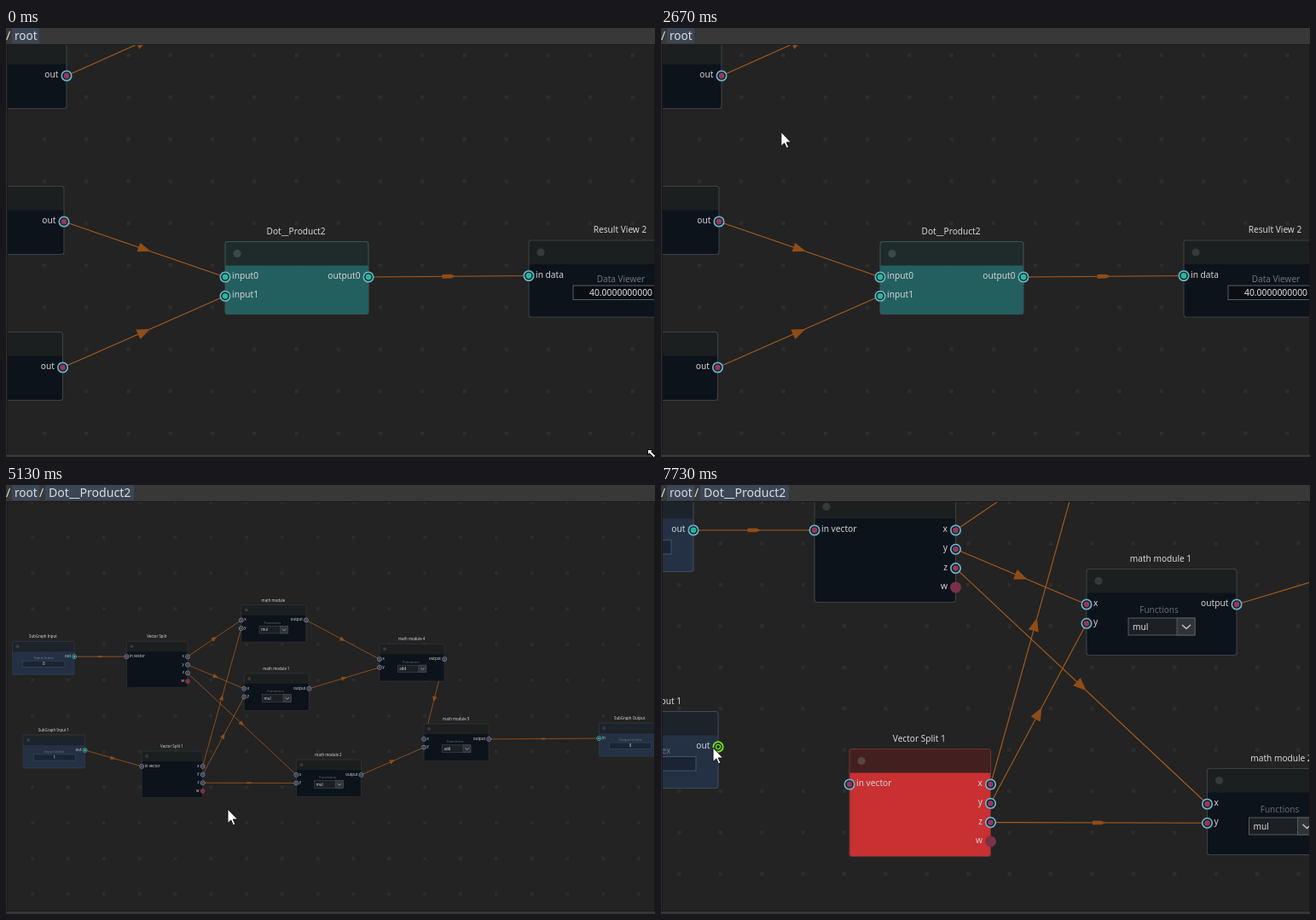
Animation of 761 by 503 pixels, one loop 8 s. Source, as an HTML page with a canvas:

```html
<!DOCTYPE html>
<html>
<head>
<meta charset="utf-8">
<style>
html, body { margin: 0; width: 100%; height: 100%; overflow: hidden; background: #232323; }
canvas { display: block; }
</style>
</head>
<body>
<canvas id="stage" width="761" height="503"></canvas>
<script>
const ctx = document.getElementById('stage').getContext('2d');
const LOOP = 8000, STEP = 200 / 3, ROW = 22.3;

const themes = {
  dark: { head: '#1b1f20', body: '#0d131a', line: '#3b4145', dot: '#363a3b' },
  blue: { head: '#1d232b', body: '#243145', line: '#3c4a58', dot: '#363c44' },
  teal: { head: '#1f2b2b', body: '#245f60', line: '#3b5355', dot: '#3a4a4a' },
  red: { head: '#432020', body: '#c93032', line: '#6a3535', dot: '#5a4340' }
};

// A node is placed by its left edge and the height of its first port row.
const node = (x, y, w, h, title, ins, outs, extra = {}) =>
  ({ x, y, w, h, title, ins, outs, theme: 'dark', pin: '#8f3a5a', ...extra });
const split = (x, y, title) => node(x, y, 165.5, 126, title, ['in vector'], ['x', 'y', 'z', 'w']);
const math = (x, y, n, op) => node(x, y, 176, 101, 'math module' + n, ['x', 'y'], ['output'], { op });
const index = (x, y, title, ins, outs, label, value) =>
  node(x, y, 168, 90, title, ins, outs, { theme: 'blue', pin: '#1db795', field: [label, value, 28, 114] });

const inner = {
  grid: [21.4, 20.2, 48.4],
  nodes: {
    in0: index(-130, 53, 'SubGraph Input', [], ['out'], 'Input Index', '0'),
    in1: index(-101, 307, 'SubGraph Input 1', [], ['out'], 'Input Index', '1'),
    split0: split(180, 53, 'Vector Split'),
    split1: split(221, 351, 'Vector Split 1'),
    m0: math(491, -46, '', 'mul'),
    m1: math(499, 140, ' 1', 'mul'),
    m2: math(640.5, 374, ' 2', 'mul'),
    m4: math(866.5, 60, ' 4', 'add'),
    m5: math(987, 277, ' 5', 'add'),
    out: index(1462, 275, 'SubGraph Output', ['in'], [], 'Output Index', '0')
  },
  wires: ['in0 0 split0 0', 'in1 0 split1 0', 'split0 0 m0 0', 'split0 1 m1 0', 'split0 2 m2 0',
    'split1 0 m0 1', 'split1 1 m1 1', 'split1 2 m2 1', 'm0 0 m4 0', 'm1 0 m4 1',
    'm4 0 m5 0', 'm2 0 m5 1', 'm5 0 out 0']
};

const root = {
  grid: [45, 32, 49.25],
  nodes: {
    a: node(-100, 56, 171, 80, '', [], ['out']),
    b: node(-100, 227, 168, 80, '', [], ['out']),
    c: node(-100, 398, 166.5, 80, '', [], ['out']),
    top: node(250, -24, 100, 80, '', ['in'], []),
    dot: node(257, 292, 168, 85, 'Dot__Product2', ['input0', 'input1'], ['output0'], { theme: 'teal', pin: '#1fbf94' }),
    view: node(613, 290.5, 216, 90, 'Result View 2', ['in data'], [],
      { pin: '#1fbf94', field: ['Data Viewer', '40.0000000000', 52, 112] })
  },
  wires: ['a 0 top 0', 'b 0 dot 0', 'c 0 dot 1', 'dot 0 view 0']
};

const menuItems = ['Allow Edit', 'Enter Node', 'Publish Node', 'Print Children', 'Cook Node',
  'Toggle Auto Cook', 'Print Path', 'Find Node By Path'];

// [step, scale, x, y]
const cameraKeys = [
  [15, .548, 9, 124], [21, .548, 9, 124], [24, .4864, 37.4, 149.5], [28, .786, -103, 25.7], [37, .786, -103, 25.7],
  [62, .548, 11, 124], [72, .548, 11, 124], [77, .432, 63.7, 178.3], [78, .432, 63.7, 178.3],
  [81, .548, 11, 124], [83, .548, 11, 124], [89, .619, 61.1, 86.5], [90, .619, 61.1, 86.5], [103, 1, 0, 0]
];
// [step, x, y]
const cursorKeys = [
  [1, 700, 470], [6, 331, 278], [21, 331, 278], [23, 267, 352], [29, 267, 352], [33, 24, 8], [35, 20, 5],
  [37, 20, 5], [44, 302, 278], [47, 302, 278], [54, 335, 290], [58, 335, 290], [62, 338, 284], [71, 338, 284],
  [76, 260, 380], [81, 260, 380], [89, 165, 348], [90, 165, 348], [103, 140, 262], [107, 221, 351],
  [110, 221, 351], [116, 61, 308]
];

function between(keys, k) {
  const n = keys.findIndex(key => key[0] > k);
  if (n < 0) return [...keys[keys.length - 1], 1];
  if (n === 0) return [...keys[0], 0];
  return [keys[n - 1], keys[n], (k - keys[n - 1][0]) / (keys[n][0] - keys[n - 1][0])];
}

function cursorAt(k) {
  const r = between(cursorKeys, k);
  if (r.length > 3) return [r[1], r[2]];
  const [a, b, p] = r;
  return [a[1] + (b[1] - a[1]) * p, a[2] + (b[2] - a[2]) * p];
}

// Scale grows geometrically and the offset follows it, which keeps the zoom centre fixed.
function cameraAt(k) {
  const r = between(cameraKeys, k);
  if (r.length > 3) return r.slice(1, 4);
  const [a, b, p] = r;
  const s = a[1] * (b[1] / a[1]) ** p;
  const q = a[1] === b[1] ? p : (s - a[1]) / (b[1] - a[1]);
  return [s, a[2] + (b[2] - a[2]) * q, a[3] + (b[3] - a[3]) * q];
}

function text(str, x, y, size, color, align = 'left') {
  ctx.font = size + 'px "Noto Sans", sans-serif';
  ctx.textAlign = align;
  ctx.fillStyle = color;
  ctx.fillText(str, x, y);
}

function rect(x, y, w, h, fill, stroke) {
  ctx.fillStyle = fill;
  ctx.fillRect(x, y, w, h);
  if (stroke) { ctx.strokeStyle = stroke; ctx.lineWidth = 1; ctx.strokeRect(x, y, w, h); }
}

function shape(points, fill, stroke) {
  ctx.beginPath();
  points.forEach(([x, y]) => ctx.lineTo(x, y));
  ctx.closePath();
  if (fill) { ctx.fillStyle = fill; ctx.fill(); }
  if (stroke) { ctx.strokeStyle = stroke; ctx.stroke(); }
}

function disc(x, y, r, fill, stroke, width) {
  ctx.beginPath();
  ctx.arc(x, y, r, 0, 7);
  if (fill) { ctx.fillStyle = fill; ctx.fill(); }
  if (stroke) { ctx.strokeStyle = stroke; ctx.lineWidth = width; ctx.stroke(); }
}

function port(x, y, pin, hot) {
  if (hot) {
    disc(x, y, 5.7, '#14200f', '#74e01c', 1.9);
    disc(x, y, 2.6, null, '#74e01c', 1.4);
  } else {
    disc(x, y, 5.7, '#11181e', '#6bb4cf', 1.7);
    disc(x, y, 3.4, pin);
  }
}

function wire(x1, y1, x2, y2, scale) {
  ctx.strokeStyle = '#a85c1e';
  ctx.lineWidth = .5 / scale + .6;
  ctx.beginPath();
  ctx.moveTo(x1, y1);
  ctx.lineTo(x2, y2);
  ctx.stroke();
  const angle = Math.atan2(y2 - y1, x2 - x1);
  const half = 2.3 + 4 * Math.min(1, 2.5 * Math.abs(Math.sin(angle)));
  const shoulder = half < 3 ? 3 : -7.5;
  ctx.save();
  ctx.translate((x1 + x2) / 2, (y1 + y2) / 2);
  ctx.rotate(angle);
  shape([[-7.5, -half], [shoulder, -half], [8, 0], [shoulder, half], [-7.5, half]], '#8f4c17');
  ctx.restore();
}

function drawNode(n, themeName, hot) {
  const { x, y, w, h } = n, top = y - 41.5, theme = themes[themeName];
  ctx.save();
  ctx.beginPath();
  ctx.roundRect(x, top, w, h, 3);
  ctx.clip();
  rect(x, top, w, 28, theme.head);
  rect(x, top + 28, w, h, theme.body);
  ctx.restore();
  ctx.strokeStyle = theme.line;
  ctx.lineWidth = 1.1;
  ctx.beginPath();
  ctx.roundRect(x, top, w, h, 3);
  ctx.stroke();
  disc(x + 14, top + 14, 4.6, theme.dot);
  text(n.title, x + w / 2 - 1, top - 9, 10.1, '#d6d6d6', 'center');

  if (n.op) {
    text('Functions', x + 85, y + 10, 10, '#666b70', 'center');
    rect(x + 49, y + 16, 78, 20, '#1c2024', '#555a5f');
    rect(x + 106, y + 16, 21, 20, '#303437', '#555a5f');
    text(n.op, x + 54, y + 30, 10.2, '#d6d6d6');
    ctx.strokeStyle = '#c0c0c0';
    ctx.lineWidth = 1.6;
    ctx.beginPath();
    ctx.moveTo(x + 112, y + 24);
    ctx.lineTo(x + 117, y + 28.5);
    ctx.lineTo(x + 122, y + 24);
    ctx.stroke();
  }
  if (n.field) {
    const [label, value, left, width] = n.field;
    text(label, x + left + width / 2, y + 7.5, 10, '#6b7480', 'center');
    rect(x + left, y + 11.5, width, 16.5, n.theme === 'blue' ? '#1b2433' : '#0a0e13', n.theme === 'blue' ? '#43536a' : '#5a5f64');
    text(value, x + left + width / 2, y + 23.7, 10.4, '#e2e2e2', 'center');
  }
  n.ins.forEach((name, i) => {
    port(x, y + ROW * i, n.pin, hot === 'in');
    text(name, x + 8, y + ROW * i + 2, 10.2, '#d2d2d2');
  });
  n.outs.forEach((name, i) => {
    const py = y + ROW * i;
    if (name === 'w') disc(x + w, py, 6.5, '#7c3049');
    else port(x + w, py, n.pin, hot === 'out');
    text(name, x + w - 9.5, py + 2, 10.2, '#d2d2d2', 'right');
  });
}

function drawGrid([gx, gy, gap], [s, ox, oy]) {
  const d = gap * s * (s < .7 ? 2 : 1), size = d / 11;
  ctx.fillStyle = '#2d2d2d';
  for (let x = (ox + gx * s) % d - d; x < 770; x += d)
    for (let y = (oy + gy * s) % d - d; y < 510; y += d)
      ctx.fillRect(x - size / 2, y - size / 2, size, size);
}

function drawGraph(graph, camera, k, cursor) {
  const [s, ox, oy] = camera, inside = graph === inner;
  drawGrid(graph.grid, camera);
  if (inside && k < 37) text('Not Editable', 22, 484, 43.4 * s, '#5a5a5a');
  ctx.save();
  ctx.translate(ox, oy);
  ctx.scale(s, s);
  const cut = inside && k >= 110;
  for (const link of graph.wires) {
    const [from, o, to, i] = link.split(' ');
    const a = graph.nodes[from], b = graph.nodes[to];
    let end = [b.x, b.y + ROW * i];
    if (cut && to === 'split1') {
      if (k >= 116) continue;
      end = cursor;
    }
    wire(a.x + a.w, a.y + ROW * o, ...end, s);
  }
  for (const [id, n] of Object.entries(graph.nodes)) {
    const hot = id === 'in1' && k >= 116 ? 'out' : id === 'split1' && k >= 107 && k < 110 ? 'in' : '';
    drawNode(n, cut && id === 'split1' ? 'red' : n.theme, hot);
  }
  ctx.restore();
  if (!inside) text(';', 0, 173, 10, '#d6d6d6');
}

function drawFrame(inside) {
  rect(0, 0, 761, 19, '#383838');
  rect(0, 19, 761, 1, '#1a1a1a');
  rect(0, 20, 1, 483, '#2e2e2e');
  rect(1, 20, 1, 480, '#171717');
  rect(760, 20, 1, 480, '#171717');
  rect(0, 499, 761, 1, '#1a1a1a');
  rect(0, 500, 761, 3, '#363636');
  rect(7, 0, 32, 18, '#3b4656');
  text('/', 0, 14, 14, '#dcdcdc');
  text('root', 10, 14, 13.6, '#dcdcdc');
  if (inside) {
    rect(46, 0, 104, 18, '#3b4656');
    text('/', 39, 14, 14, '#dcdcdc');
    text('Dot__Product2', 50, 14, 14.1, '#dcdcdc');
  }
}

function drawMenu(cursor) {
  rect(303, 280, 138, 180, 'rgba(0,0,0,.3)');
  rect(301.5, 278.5, 137, 179, '#2d2d2d', '#1b1b1b');
  const hover = Math.floor((cursor[1] - 279) / 22);
  menuItems.forEach((item, i) => {
    if (i === hover) rect(303, 279, 134, 22, '#dba006');
    text(item, 321, 296 + 22 * i, 11.4, i === hover ? '#6e4a10' : '#dedede');
  });
}

function drawCursor([x, y], k) {
  ctx.save();
  ctx.lineWidth = 1;
  ctx.translate(x, y);
  if (k < 1) {
    ctx.setTransform(1, 0, 0, 1, 752.5, 494.5);
    shape([[0, 0], [6, 0], [4.2, 2], [9, 7], [7, 9], [2, 4.2], [0, 6]], '#fff', '#000');
  } else {
    shape([[0, 0], [0, 16.5], [3.8, 13], [6.4, 18.8], [8.8, 17.8], [6.3, 12], [11.6, 12]], '#fff', '#111');
  }
  ctx.restore();
}

function draw(now) {
  const k = Math.floor((now % LOOP + 5) / STEP);
  const inside = (k >= 15 && k < 37) || k >= 62;
  const cursor = cursorAt(k);
  rect(0, 0, 761, 503, '#232323');
  drawGraph(inside ? inner : root, inside ? cameraAt(k) : [1, 0, 0], k, cursor);
  drawFrame(inside);
  if (k >= 47 && k < 58) drawMenu(cursor);
  drawCursor(cursor, k);
  requestAnimationFrame(() => draw(performance.now() - start));
}

const start = performance.now();
draw(0);
</script>
</body>
</html>
```
